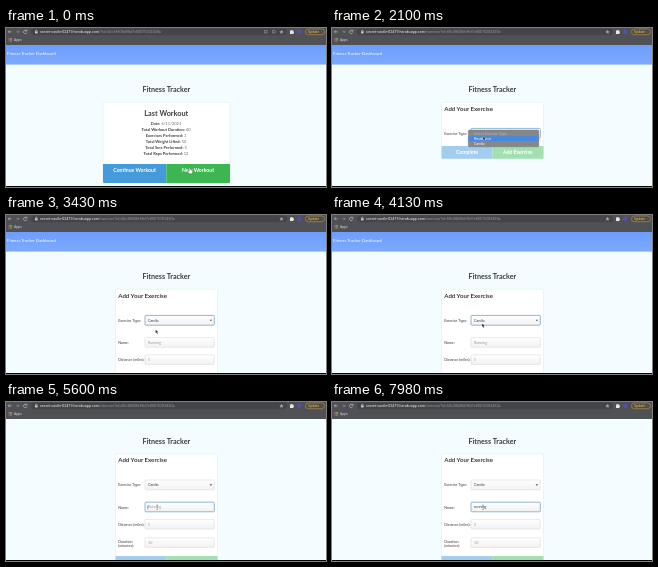
Write an HTML page that moves like this. It is 320 px wide and 159 px high and loops after 8000 ms.

```html
<!DOCTYPE html>
<html lang="en">
<head>
<meta charset="utf-8">
<title>Fitness Tracker</title>
<style>
  html, body { margin: 0; width: 100%; height: 100%; overflow: hidden; background: #f3fcfe; }
  svg { display: block; width: 100vw; height: 100vh; }
  text { font-family: Lato, sans-serif; font-size: 3.7px; fill: #3c3c3e; }
  .bar text { font-family: Roboto, sans-serif; }
  .bold { font-weight: 700; }
  .mid { text-anchor: middle; }
  .btn { font-size: 5.15px; font-weight: 700; fill: #fff; text-anchor: middle; }
  .hint { fill: #999; }
  #stats text { font-size: 4px; }
</style>
</head>
<body>
<svg viewBox="0 0 320 159" preserveAspectRatio="none">
  <defs>
    <linearGradient id="nav" x2="0" y2="1">
      <stop stop-color="#6c9dfd"/><stop offset="1" stop-color="#7da9ff"/>
    </linearGradient>
    <linearGradient id="field" x2="0" y2="1">
      <stop stop-color="#fff"/><stop offset="1" stop-color="#f2f2f2"/>
    </linearGradient>
  </defs>
  <rect width="320" height="159" fill="#f3fcfe"/>

  <g id="page">
    <rect y="16" width="320" height="20.6" fill="url(#nav)"/>
    <text x="1" y="27" style="font-size:4.25px;fill:#fff">Fitness Tracker Dashboard</text>
    <text x="160.3" y="64.4" class="bold mid" style="font-size:7.2px">Fitness Tracker</text>

    <g id="last">
      <rect x="97" y="74.3" width="127" height="80.7" rx="1" fill="#fff" stroke="#dde6ea" stroke-width=".5"/>
      <text x="160.3" y="87.9" class="bold mid" style="font-size:7.3px">Last Workout</text>
      <g id="stats"></g>
      <path d="M97 136h63.3v19h-62.3q-1 0-1-1z" fill="#459ad9"/>
      <path d="M160.3 136h63.7v18q0 1-1 1h-62.7z" fill="#3cb650"/>
      <text x="128.6" y="144.4" class="btn">Continue Workout</text>
      <text x="192" y="144.4" class="btn">New Workout</text>
    </g>

    <g id="form">
      <rect id="card" x="109.5" y="74.3" width="102" rx="1" fill="#fff" stroke="#dfe8ec" stroke-width=".5"/>
      <text x="112.2" y="82.8" class="bold" style="font-size:6.15px">Add Your Exercise</text>
      <text x="112.2" y="106.8">Exercise Type:</text>
      <rect id="select" x="139" y="100.4" width="69.3" height="9.8" rx="1" fill="url(#field)"/>
      <text id="choice" x="142" y="106.6"></text>
      <path d="M203.6 104.7h2.6l-1.3 1.6z" fill="#555"/>
      <g id="fields"></g>
      <g id="actions">
        <path d="M109.5 0h50.8v12.8h-49.8q-1 0-1-1z" fill="#a3cdef"/>
        <path d="M160.3 0h51.2v11.8q0 1-1 1h-50.2z" fill="#a3dfb0"/>
        <text x="135" y="8.2" class="btn">Complete</text>
        <text x="185.7" y="8.2" class="btn">Add Exercise</text>
      </g>
      <g id="menu">
        <rect x="136.3" y="102" width="70.5" height="16.8" rx="1.3" fill="#858789" stroke="#6d6f71" stroke-width=".4"/>
        <rect id="hover" x="136.5" width="70.1" height="4.7" fill="#4488e8"/>
        <text x="142" y="107" style="fill:#b9babb">Select Exercise Type</text>
        <text x="142" y="111.8" style="fill:#fff">Resistance</text>
        <text x="142" y="116.5" style="fill:#fff">Cardio</text>
      </g>
    </g>
  </g>

  <g class="bar">
    <rect width="320" height="17" fill="#505154"/>
    <rect x="25" y=".6" width="256" height="6.6" rx="3.3" fill="#444548"/>
    <g fill="none" stroke="#c8cace" stroke-width=".6">
      <path d="M5.5 3.8h-3.2m1.4-1.4l-1.4 1.4 1.4 1.4"/>
      <path d="M10 3.8h3.2m-1.4-1.4l1.4 1.4-1.4 1.4" stroke="#8f9195"/>
      <path id="reload" d="M20.6 3a1.7 1.7 0 1 0 .2 1.5M20.9 1.8v1.4h-1.4"/>
      <path id="stop" d="M18 2.5l2.7 2.7m0-2.7l-2.7 2.7"/>
      <path d="M29.5 3.6v-.7a.8.8 0 0 1 1.6 0v.7"/>
      <path id="tools" d="M258.5 2.4h2.6v2.7h-2.6zM266.5 2.4h2.6v2.7h-2.6z" stroke="#9a9ca0"/>
    </g>
    <rect x="29" y="3.4" width="2.6" height="2" fill="#c8cace"/>
    <path d="M275.5 1.8l.6 1.4 1.5.1-1.1 1 .4 1.5-1.4-.8-1.4.8.4-1.5-1.1-1 1.5-.1z" fill="#a4a6aa"/>
    <path d="M284 2.6h1a.7.7 0 0 1 1.4 0h1v1a.7.7 0 0 1 0 1.4v1h-3.4z" fill="#e4e5e7"/>
    <circle cx="293.3" cy="3.8" r="2.4" fill="#5450a8"/>
    <rect x="299.5" y="1" width="19" height="5.7" rx="2.8" fill="#504c44" stroke="#d0a452" stroke-width=".5"/>
    <text x="302" y="5" style="font-size:3.5px;fill:#f0c05c">Update</text>
    <text x="315.5" y="5" style="font-size:3.5px;fill:#f0c05c">:</text>
    <text x="34" y="5.1" style="font-size:3.7px;fill:#eceded">secret-castle-02479.herokuapp.com<tspan id="path" fill="#97999d"></tspan></text>
    <g id="apps"></g>
    <text x="8" y="13" style="font-size:3.4px;fill:#d5d6d8">Apps</text>
  </g>

  <rect y="158" width="320" height="1" fill="#050505"/>

  <g id="mouse">
    <path id="arrow" d="M0 0v3.8l.9-.8.7 1.5.8-.4-.7-1.4h1.3z" fill="#222" stroke="#fff" stroke-width=".3"/>
    <path id="hand" d="M-.5-2.2q.6-.6 1.1 0v2l2.2.6q.6.3.4 1.2l-.6 2.2h-3l-1.8-2.4q.2-.8 1-.4l.7.5z" fill="#fff" stroke="#333" stroke-width=".35"/>
    <path id="beam" d="M-.8-2.4q.8 0 .8.7v3.4q0 .7-.8.7M.8-2.4q-.8 0-.8.7M0 1.7q0 .7.8.7" fill="none" stroke="#555" stroke-width=".4"/>
  </g>
</svg>
<script>
const LOOP = 8000, SCROLL = 22.4;
const $ = id => document.getElementById(id);
const set = (el, attrs) => { for (const k in attrs) el.setAttribute(k, attrs[k]); };
const show = (id, on) => { $(id).style.display = on ? '' : 'none'; };
const add = (parent, tag, attrs, text) => {
  const el = document.createElementNS('http://www.w3.org/2000/svg', tag);
  set(el, attrs);
  if (text) el.textContent = text;
  return parent.appendChild(el);
};
const ramp = (t, a, b) => Math.min(1, Math.max(0, (t - a) / (b - a)));
const smooth = p => p * p * (3 - 2 * p);

[['Date', '6/11/2021'], ['Total Workout Duration', 40], ['Exercises Performed', 1],
 ['Total Weight Lifted', 50], ['Total Sets Performed', 5], ['Total Reps Performed', 12]]
  .forEach(([label, value], i) => {
    const row = add($('stats'), 'text', { x: 160, y: 97.4 + i * 6, class: 'mid' });
    add(row, 'tspan', { class: 'bold' }, label + ': ');
    add(row, 'tspan', { fill: '#666' }, String(value));
  });

const inputs = [['Name:', 'Running', 122.6], ['Distance (miles):', '5', 139.8], ['Duration', '10', 158.2]]
  .map(([label, hint, y], i) => {
    const g = $('fields');
    add(g, 'text', { x: 112.2, y: y + (i < 2 ? 6.4 : 4.8) }, label);
    if (i === 2) add(g, 'text', { x: 112.2, y: y + 9.4 }, '(minutes):');
    const box = add(g, 'rect', { x: 139, y, width: 69.3, height: 9.6, rx: 1, fill: 'url(#field)' });
    const text = add(g, 'text', { x: 142, y: y + 6.2, class: 'hint' }, hint);
    return { box, text };
  });
const caret = add($('fields'), 'rect', { y: 125.6, width: .4, height: 4.2, fill: '#222' });

for (let i = 0; i < 9; i++)
  add($('apps'), 'rect', { x: 2.6 + i % 3 * 1.3, y: 10 + Math.floor(i / 3) * 1.3, width: .9, height: .9,
    fill: ['#c9857c', '#b9a06a', '#8fa6bd'][i % 3] });

const outline = (el, focus) => set(el, { stroke: focus ? '#82afcf' : '#ccd0d2', 'stroke-width': focus ? .9 : .45 });

// time, x, y
const track = [[0, 183.6, 142], [770, 183.6, 142], [1050, 151, 109], [1190, 150, 108.6], [2030, 150, 108.6],
  [2100, 151, 108.6], [2480, 151, 109], [2660, 149.5, 114.2], [3850, 149.5, 114.6], [4130, 150, 108.4],
  [4830, 150, 108.4], [5180, 151.2, 105.2], [LOOP, 151.2, 105.2]];
function mouseAt(t) {
  const i = Math.max(1, track.findIndex(p => p[0] > t));
  const [t0, x0, y0] = track[i - 1], [t1, x1, y1] = track[i];
  const p = smooth(ramp(t, t0, t1));
  return [x0 + (x1 - x0) * p, y0 + (y1 - y0) * p];
}

const keys = [6090, 6300, 6440, 6545, 7070, 7140, 7280];

function draw(t) {
  const onForm = t >= 490, open = t >= 1750 && t < 3340, full = t >= 3290;
  show('last', !onForm);
  show('form', onForm);
  show('tools', !onForm);
  $('path').textContent = onForm ? '/exercise?id=60c38608d98d7e80015202430a' : '/?id=60c38608d98d7e80015202430a';
  const busy = t >= 140 && t < 910;
  show('stop', busy);
  show('reload', !busy);
  const scroll = SCROLL * (1 - (1 - ramp(t, 4430, 4620)) ** 2);
  set($('page'), { transform: `translate(0 ${-scroll})` });

  set($('card'), { height: full ? 115 : 56.5 });
  set($('actions'), { transform: `translate(0 ${full ? 176.5 : 118})` });
  show('fields', full);
  $('choice').textContent = full ? 'Cardio' : 'Select Exercise Type';
  outline($('select'), t >= 1750 && t < 5530);
  show('menu', open);
  $('menu').style.opacity = 1 - ramp(t, 3200, 3340);
  show('hover', t >= 2060);
  set($('hover'), { y: t < 2590 ? 108.3 : 113.2 });

  const typed = 'running'.slice(0, keys.filter(k => t >= k).length);
  const [name] = inputs;
  const focus = t >= 5530;
  inputs.forEach(f => outline(f.box, f === name && focus));
  const label = typed || 'Running';
  if (name.text.textContent !== label) name.text.textContent = label;
  set(name.text, { class: typed ? '' : 'hint' });
  const last = keys.filter(k => t >= k).pop() || 5530;
  caret.style.display = focus && (t - last) % 1060 < 530 ? '' : 'none';
  set(caret, { x: 142 + (typed && full ? name.text.getComputedTextLength() : -.3) });

  const [x, y] = mouseAt(t);
  set($('mouse'), { transform: `translate(${x} ${y})` });
  const beam = t >= 5110;
  show('hand', t < 840);
  show('arrow', t >= 840 && !beam);
  show('beam', beam && !(t >= 6510 && t < 7980));
}

const start = performance.now();
function tick() {
  draw((performance.now() - start) % LOOP);
  requestAnimationFrame(tick);
}
tick();
</script>
</body>
</html>
```
